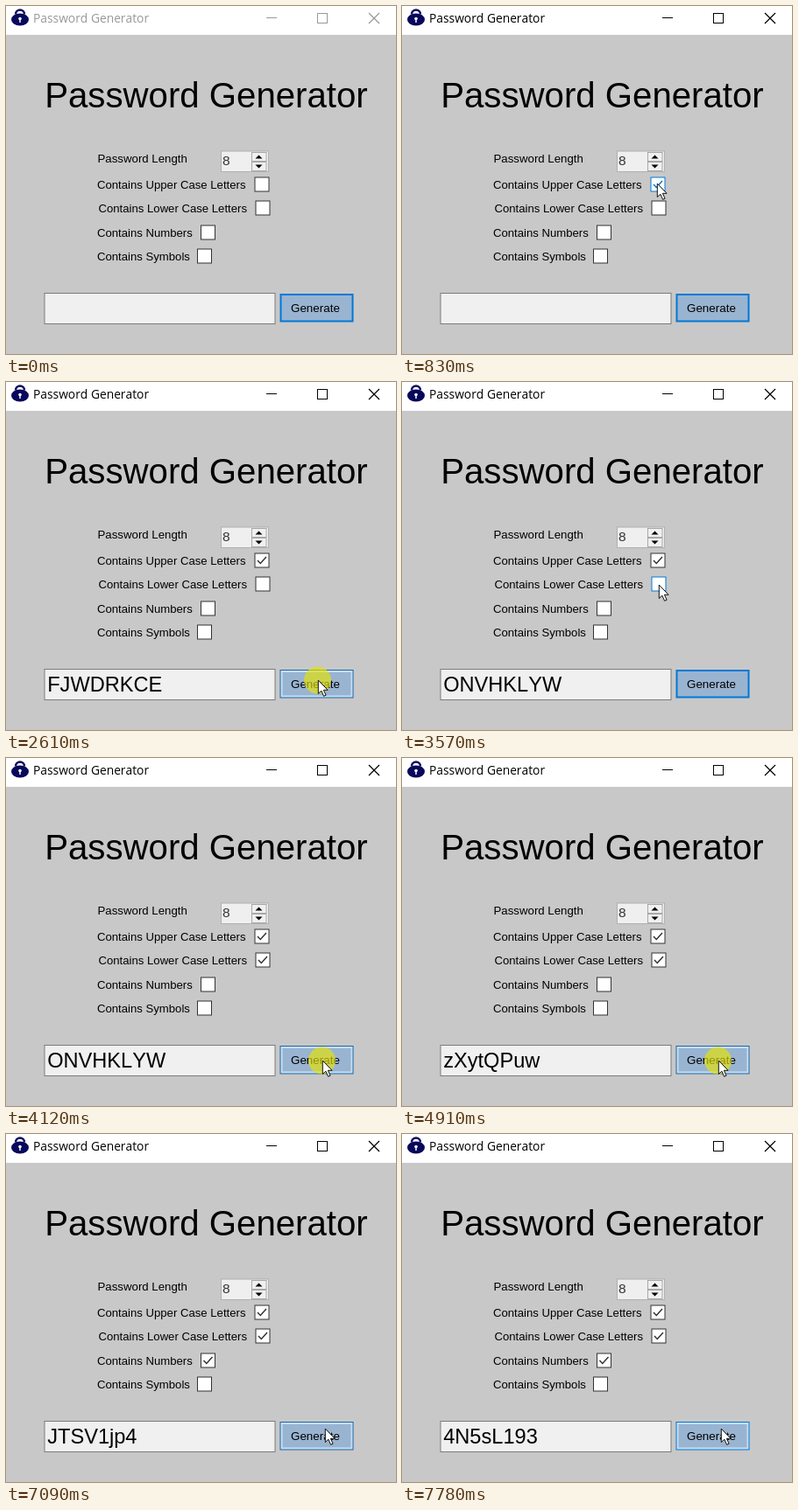
An HTML page with a canvas for the animation above (8 s loop, 445x398 px).

```html
<!DOCTYPE html>
<html lang="en">
<head>
<meta charset="utf-8">
<title>Password Generator</title>
<style>
  html, body { margin: 0; width: 100%; height: 100%; overflow: hidden; background: #c8c8c8; }
  canvas { display: block; font-kerning: none; }
</style>
</head>
<body>
<canvas id="stage" width="445" height="398"></canvas>
<script>
const ctx = document.getElementById('stage').getContext('2d');
ctx.fontKerning = 'none';
const LOOP = 8000, STEP = 70;
const SANS = '"Liberation Sans", Arial, sans-serif';
const BLUE = '#0078d7';
const BUTTON = [312.5, 329, 84, 32.5];

// Pointer moves: start, time of last step, target x, y
const moves = [
  [200, 620, 291, 203],
  [1050, 1390, 358, 349], [1460, 1530, 356, 341],
  [3150, 3430, 293, 232], [3710, 3920, 361, 346],
  [5580, 5720, 263, 265], [5790, 5860, 227, 258], [6070, 6350, 364, 337]
];
// Clicks: press, release, checkbox index or generated password, highlight delay
const clicks = [
  [690, 830, 0, 0],
  [1600, 1670, 'PGTXBMQA', 0], [1940, 2080, 'FJWDRKCE', 0], [2540, 2680, 'ONVHKLYW', 0],
  [3640, 3710, 1, 0],
  [4120, 4250, 'hVbRmKcs', 0], [4580, 4650, 'zXytQPuw', 0], [4910, 5110, 'qiltzDtx', 0],
  [5930, 6070, 2, 0],
  [6550, 6760, 'JTSV1jp4', 70], [7090, 7240, 'w7KdR2xG', 70], [7570, 7710, '4N5sL193', 70]
];
// Label, its x and baseline, then the left and top of the checkbox
const options = [
  ['Contains Upper Case Letters', 104, 209, 283.5, 195.5],
  ['Contains Lower Case Letters', 105.5, 236, 284.5, 222.5],
  ['Contains Numbers', 104, 264, 222, 250.5],
  ['Contains Symbols', 104, 291, 218, 277.5]
];

function box(x, y, w, h, fill, border, line = 1) {
  ctx.fillStyle = border;
  ctx.fillRect(x, y, w, h);
  ctx.fillStyle = fill;
  ctx.fillRect(x + line, y + line, w - 2 * line, h - 2 * line);
}

function text(str, x, y, size, color = '#000', family = SANS) {
  ctx.font = `${size}px ${family}`;
  ctx.fillStyle = color;
  ctx.fillText(str, x, y);
}

function trace(points, close) {
  ctx.beginPath();
  for (const [x, y] of points) ctx.lineTo(x, y);
  if (close) ctx.closePath();
}

function stroke(points, color, width = 1) {
  trace(points);
  ctx.strokeStyle = color;
  ctx.lineWidth = width;
  ctx.stroke();
}

function disc(x, y, rx, ry, color) {
  ctx.beginPath();
  ctx.ellipse(x, y, rx, ry, 0, 0, 7);
  ctx.fillStyle = color;
  ctx.fill();
}

function pointerAt(t) {
  let x = 445, y = 110;
  for (const [start, end, toX, toY] of moves) {
    if (t < start) break;
    const done = Math.min(1, (Math.floor((t - start) / STEP) + 1) * STEP / (end - start + STEP));
    x += (toX - x) * done;
    y += (toY - y) * done;
  }
  return { x: Math.round(x), y: Math.round(y) };
}

function stateAt(t) {
  const state = { pointer: pointerAt(t), active: t >= clicks[0][0], password: '', checked: [] };
  for (const [press, release, result, delay] of clicks) {
    if (t >= release) {
      if (typeof result === 'string') state.password = result;
      else state.checked[result] = true;
    } else if (t >= press) {
      state.pressed = true;
      state.highlight = t >= press + delay;
    }
  }
  return state;
}

function inside(p, x, y, w, h) {
  return p.x >= x && p.x < x + w && p.y >= y && p.y < y + h;
}

function drawTitleBar(active) {
  const ink = active ? '#000' : '#999';
  ctx.fillStyle = '#fff';
  ctx.fillRect(0, 0, 445, 33);
  ctx.beginPath();
  ctx.arc(16, 9.5, 5, Math.PI, 0);
  ctx.strokeStyle = '#08085c';
  ctx.lineWidth = 2.5;
  ctx.stroke();
  disc(16, 15.5, 10, 7, '#08085c');
  disc(16, 14.5, 1.8, 1.8, '#fff');
  ctx.fillRect(15.3, 14, 1.4, 5);
  text('Password Generator', 31, 19, 13.8, ink, '"Open Sans", sans-serif');
  stroke([[297, 13.5], [309, 13.5]], ink);
  ctx.strokeRect(355.5, 8.5, 11, 11);
  stroke([[414, 8], [426, 20]], ink, 1.2);
  stroke([[426, 8], [414, 20]], ink, 1.2);
}

function drawSpinner() {
  box(245, 165.5, 55, 24.5, '#efefef', '#b0b0b0');
  text('8', 247, 182, 15.5, '#333');
  for (const [top, tip] of [[167, -1], [178, 1]]) {
    const middle = top + 5.5;
    box(280, top, 17.5, 11, '#f0f0f0', '#a8a8a8');
    trace([[284.5, middle - 2 * tip], [292.5, middle - 2 * tip], [288.5, middle + 2 * tip]], true);
    ctx.fillStyle = '#000';
    ctx.fill();
  }
}

function drawButton(hover, pressed) {
  if (!hover) return box(...BUTTON, '#99b4d1', BLUE, 2);
  const [x, y, w, h] = BUTTON;
  box(x, y, w, h, '#c4def4', pressed ? '#1f66a5' : BLUE);
  ctx.fillStyle = '#99b4d1';
  ctx.fillRect(x + 3, y + 3, w - 6, h - 6);
}

function drawPointer({ x, y }) {
  trace([[0, 0], [0, 15.5], [3.6, 12.2], [6.3, 18.3], [8.8, 17.2], [6.1, 11.3], [10.8, 11.3]]
    .map(([dx, dy]) => [x + dx + 0.3, y + dy]), true);
  ctx.fillStyle = '#fff';
  ctx.fill();
  ctx.strokeStyle = '#111';
  ctx.lineWidth = 1;
  ctx.stroke();
}

function draw(t) {
  const { pointer, active, password, checked, pressed, highlight } = stateAt(t);
  ctx.fillStyle = '#c8c8c8';
  ctx.fillRect(0, 0, 445, 398);
  drawTitleBar(active);
  text('Password Generator', 44.2, 116, 40.2);
  text('Password Length', 104.5, 179, 13.25);
  drawSpinner();

  options.forEach(([label, x, y, left, top], i) => {
    const ink = inside(pointer, left, top, 17, 17) ? BLUE : '#333';
    text(label, x, y, 13.15);
    box(left, top, 17, 17, '#fff', ink);
    if (checked[i]) stroke([[left + 3.5, top + 8.5], [left + 6.8, top + 12], [left + 13.5, top + 4.5]], ink, 1.5);
  });

  box(43.5, 328, 264, 36, '#f0f0f0', '#7a7a7a');
  text(password, 47.2, 354, 23.6);
  drawButton(inside(pointer, ...BUTTON), pressed);
  text('Generate', 325, 350, 13.4);
  if (highlight) disc(pointer.x - 0.5, pointer.y, 15.5, 15.5, 'rgba(232,228,0,.65)');
  if (t >= moves[0][0]) drawPointer(pointer);
}

function tick() {
  draw(performance.now() % LOOP);
  requestAnimationFrame(tick);
}
tick();
</script>
</body>
</html>
```
